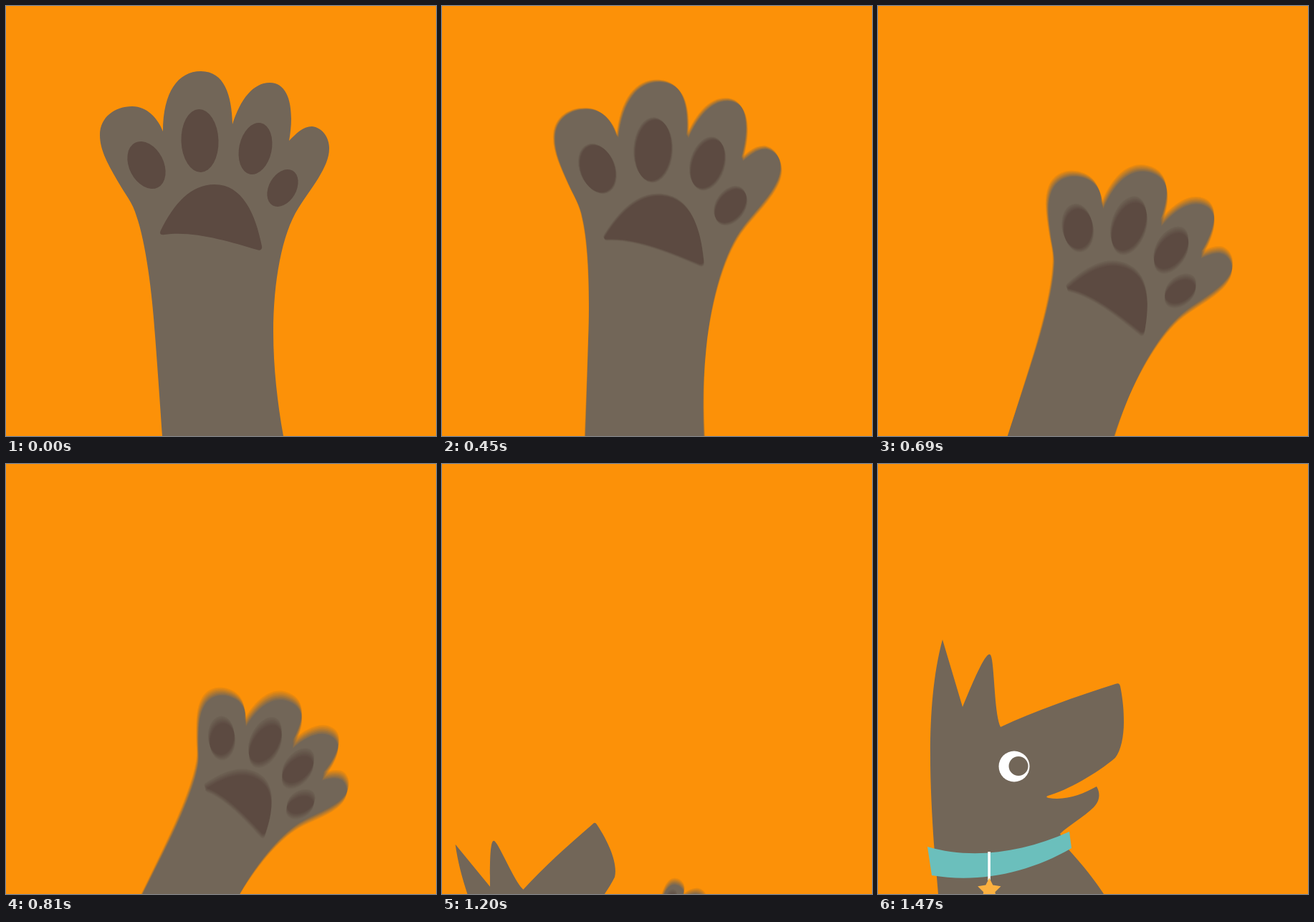
Write an HTML page with a canvas that moves like this. It is 600 px wide and 600 px high and loops after 1.8 s.

```html
<!DOCTYPE html>
<html lang="en">
<head>
<meta charset="utf-8">
<title>Paw and dog</title>
<style>
  html, body { margin: 0; width: 100%; height: 100%; overflow: hidden; background: #fc9108; }
  canvas { display: block; width: 100vw; height: 100vh; }
</style>
</head>
<body>
<canvas id="stage" width="600" height="600"></canvas>
<script>
const SIZE = 600, LOOP = 1800, STEP = 30;
const SHUTTER = 16, SAMPLES = 10;
const ORANGE = '#fc9108', FUR = '#726658', PAD = '#5c4a41', TEAL = '#6bbfbc', STAR = '#fbb040';

const stage = document.getElementById('stage').getContext('2d');
const layer = document.createElement('canvas');
layer.width = layer.height = SIZE;
const scene = layer.getContext('2d');

const ARM = new Path2D(`M226 700 L218 600 C214 540 211 500 208 460 C204 400 195 330 182 293
  C177 275 166 262 158 248 C143 222 131 202 131 180 C131 155 152 140 176 140
  C197 140 212 157 219 175 C219 120 240 91 272 91 C305 91 315 125 316 165
  C327 130 345 107 368 107 C398 107 402 150 395 188 C405 178 414 168 427 168
  C443 170 451 185 451 199 C451 225 425 255 408 282 C385 318 373 385 373 455
  C373 505 379 555 387 600 L408 700 Z`);
const PALM = new Path2D(`M216 313 C235 275 258 249 291 249 C330 249 348 290 357 335
  C358 340 354 342 350 340 C310 328 260 313 221 319 C215 320 214 317 216 313 Z`);
// x, y, half width, half height, tilt in degrees
const TOES = [[196, 222, 24, 35, -27], [270.5, 188, 26, 44, -2], [348, 199, 22.7, 36.5, 12], [386, 254, 19, 28, 30]];

const DOG = new Path2D(`M90 245 L118 339 C130 310 146 271 154 266 C157 264 158 268 159 273
  C163 300 163 350 171 367 C220 344 275 325 331 307 C336 305 337 307 338 310
  C342 330 343 345 343 360 C343 380 339 400 331 410 C305 432 265 455 237 463
  Q233 465 238 466 C262 470 285 461 305 450 C311 460 309 471 301 479
  C288 492 265 505 254 516 L266 538 C286 560 302 580 315 600 L370 720 L93 720
  L84 600 L78 530 C72 440 67 330 90 245 Z`);
const COLLAR = new Path2D('M69 534 C130 552 200 543 267 513 L270 536 C210 571 140 585 75 574 Z');

// time, x, y, degrees, scale of the paw around its first toe
const PAW_KEYS = [
  [210, 196, 222, 0, 1], [450, 217, 227, 6, 1], [690, 279, 310, 22, 0.87],
  [960, 320, 482, 40.3, 0.563], [1200, 320, 608, 51, 0.3], [1350, 320, 690, 58, 0.15]
];

const rad = deg => deg * Math.PI / 180;
const smooth = (from, to, t) => {
  const u = Math.min(1, Math.max(0, (t - from) / (to - from)));
  return u * u * (3 - 2 * u);
};

function slope(keys, i, c) {
  const a = keys[i - 1], b = keys[i + 1];
  return !a || !b || a[c] === keys[i][c] ? 0 : (b[c] - a[c]) / (b[0] - a[0]);
}

function spline(keys, t) {
  const last = keys.length - 1;
  if (t <= keys[0][0]) return keys[0].slice(1);
  if (t >= keys[last][0]) return keys[last].slice(1);
  const i = keys.findIndex(k => k[0] > t) - 1;
  const a = keys[i], b = keys[i + 1], span = b[0] - a[0], u = (t - a[0]) / span;
  const s = u * u * (3 - 2 * u);
  return a.slice(1).map((v, n) => {
    const c = n + 1;
    return v + (b[c] - v) * s + span * u * (1 - u) *
      ((1 - u) * slope(keys, i, c) - u * slope(keys, i + 1, c));
  });
}

function pose(ctx, x, y, deg, scale, anchorX, anchorY) {
  ctx.translate(x, y);
  ctx.rotate(rad(deg));
  ctx.scale(scale, scale);
  ctx.translate(-anchorX, -anchorY);
}

function fill(ctx, color, path) {
  ctx.fillStyle = color;
  ctx.fill(path);
}

function disc(ctx, color, x, y, rx, ry = rx, tilt = 0) {
  const path = new Path2D();
  path.ellipse(x, y, rx, ry, rad(tilt), 0, Math.PI * 2);
  fill(ctx, color, path);
}

function drawRays(ctx, t) {
  const outer = 286 * smooth(0, 360, t);
  const inner = 90 + 196 * smooth(150, 440, t);
  if (outer <= inner) return;
  ctx.fillStyle = 'rgba(255,255,255,0.4)';
  for (let i = 0; i < 8; i++) {
    ctx.save();
    ctx.translate(300, 300);
    ctx.rotate(i * Math.PI / 4);
    ctx.fillRect(inner, -10, outer - inner, 20);
    ctx.restore();
  }
}

function drawPaw(ctx, t) {
  ctx.save();
  pose(ctx, ...spline(PAW_KEYS, t), 196, 222);
  fill(ctx, FUR, ARM);
  TOES.forEach(toe => disc(ctx, PAD, ...toe));
  fill(ctx, PAD, PALM);
  ctx.restore();
}

function drawStar(ctx, x, y, r) {
  const path = new Path2D();
  for (let i = 0; i < 10; i++) {
    const a = i * Math.PI / 5, d = i % 2 ? r * 0.5 : r;
    path.lineTo(x + d * Math.sin(a), y - d * Math.cos(a));
  }
  path.closePath();
  fill(ctx, STAR, path);
}

function drawDog(ctx, t) {
  if (t < 1140) return;
  const away = Math.pow(Math.max(0, (1470 - t) / 270), 1.85);
  ctx.save();
  pose(ctx, 180 + 10 * away, 600 + 158 * away, -22.8 * away, 1 - 0.223 * away, 180, 600);
  fill(ctx, FUR, DOG);
  disc(ctx, '#fff', 190, 422, 21.5);
  disc(ctx, FUR, 196, 421.5, 13.5);
  fill(ctx, TEAL, COLLAR);
  ctx.fillStyle = '#fff';
  ctx.fillRect(153.3, 541, 3.6, 40);
  drawStar(ctx, 155.3, 594.5, 17);
  ctx.restore();
}

function drawBackdrop(t) {
  scene.fillStyle = ORANGE;
  scene.fillRect(0, 0, SIZE, SIZE);
  drawRays(scene, t);
  drawPaw(scene, t);
}

function render(t) {
  // Running average over the shutter gives the motion blur.
  const samples = t >= 150 && t < 1350 ? SAMPLES : 1;
  for (let i = 0; i < samples; i++) {
    drawBackdrop(t + SHUTTER * ((i + 0.5) / samples - 0.5));
    stage.globalAlpha = 1 / (i + 1);
    stage.drawImage(layer, 0, 0);
  }
  stage.globalAlpha = 1;
  drawDog(stage, t);
}

const start = performance.now();
let shown = -1;
function tick() {
  const t = Math.floor((performance.now() - start) % LOOP / STEP) * STEP;
  if (t !== shown) render(shown = t);
  requestAnimationFrame(tick);
}
tick();
</script>
</body>
</html>
```
